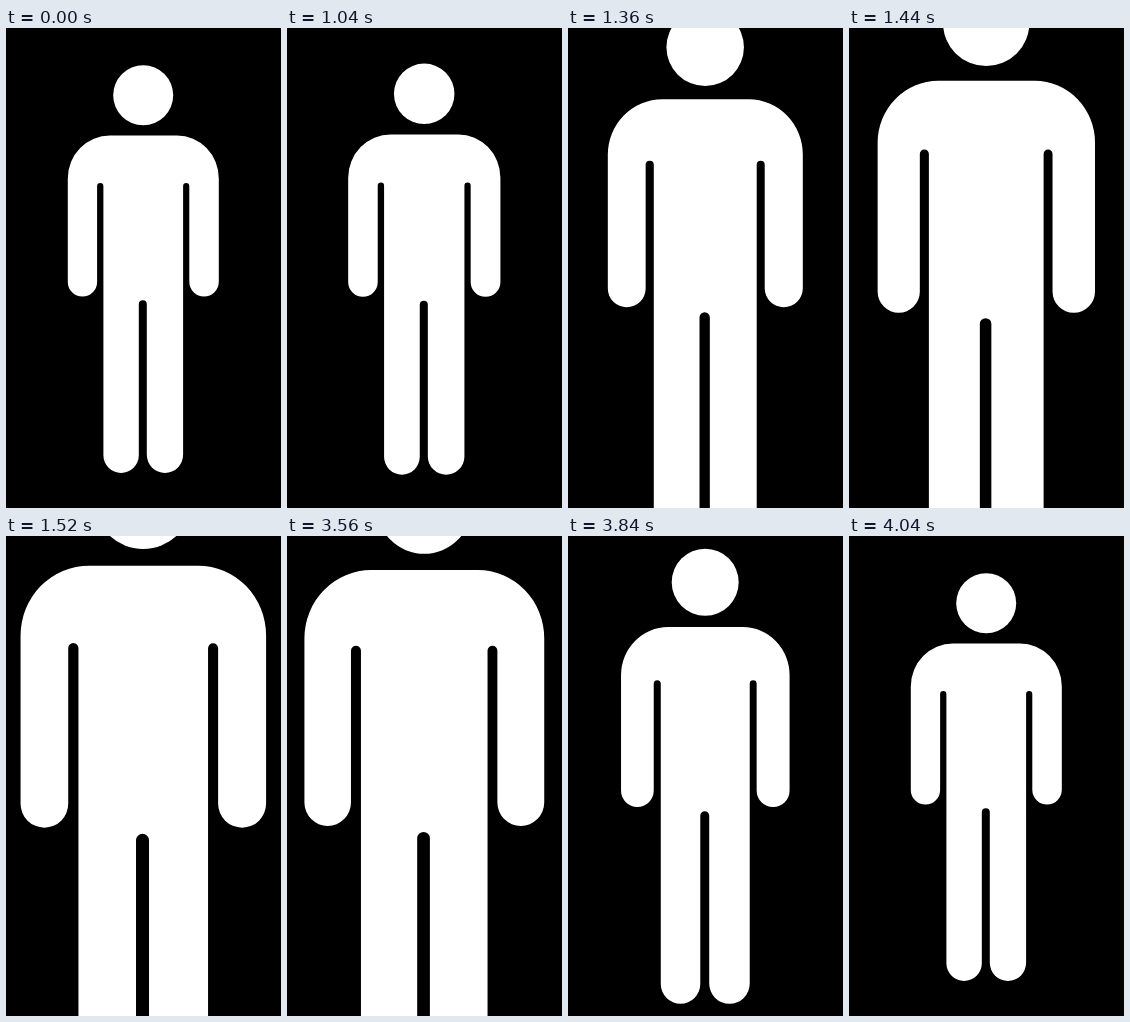
Animation, 275 px wide and 480 px high, one loop 5.04 s. Source, as an HTML page:

```html
<!DOCTYPE html>
<html lang="en">
<head>
<meta charset="utf-8">
<title>Zooming figure</title>
<style>
  html, body { margin: 0; width: 100%; height: 100%; overflow: hidden; background: #000; }
  svg { display: block; width: 100vw; height: 100vh; }
</style>
</head>
<body>
<svg viewBox="0 0 275 480">
  <g id="figure" fill="#fff">
    <circle cx="137.2" cy="67.2" r="30"/>
    <path d="M104 107.4H171A41.8 43 0 0 1 212.8 150.4V253.8a14.75 14.75 0 0 1 -29.5 0
      V158.2a3.1 3.1 0 0 0 -6.2 0V426.8a18.15 18.15 0 0 1 -36.3 0V276.3a4 4 0 0 0 -8 0
      V427.2a17.7 17.7 0 0 1 -35.4 0V158.2a3.15 3.15 0 0 0 -6.3 0V253.9a14.65 14.65 0 0 1 -29.3 0
      V150.4A42.2 43 0 0 1 104 107.4Z"/>
  </g>
</svg>
<script>
const LOOP = 5040, STEP = 40, STEPS = 13, ZOOM_IN = 1040, ZOOM_OUT = 3560;
const CENTER_X = 137.25, EXTRA_SCALE = 0.626, LIFT = 145;
const figure = document.getElementById('figure');

// Number of completed steps since the start of a zoom
const stepsSince = (time, start) => Math.floor((time - start) / STEP + 0.001);

// Zoom amount (0 to 1) for scale and vertical shift
function zoomAt(time) {
  if (time < ZOOM_IN) return [0, 0];
  if (time < ZOOM_OUT) {
    const x = Math.min(1, (stepsSince(time, ZOOM_IN) + 1) / STEPS);
    const p = 0.12 * x + 0.613 * x ** 2 + 0.267 * x ** 3;
    return [p, p];
  }
  const n = stepsSince(time, ZOOM_OUT);
  const left = n >= STEPS - 1 ? 0 : 1 - (n + 0.4) / STEPS;
  return [left ** 2, left ** 1.92];
}

function draw() {
  const [zoom, shift] = zoomAt(performance.now() % LOOP);
  const scale = 1 + EXTRA_SCALE * zoom;
  figure.setAttribute('transform',
    `translate(${CENTER_X * (1 - scale)} ${-LIFT * shift}) scale(${scale})`);
  requestAnimationFrame(draw);
}
draw();
</script>
</body>
</html>
```
